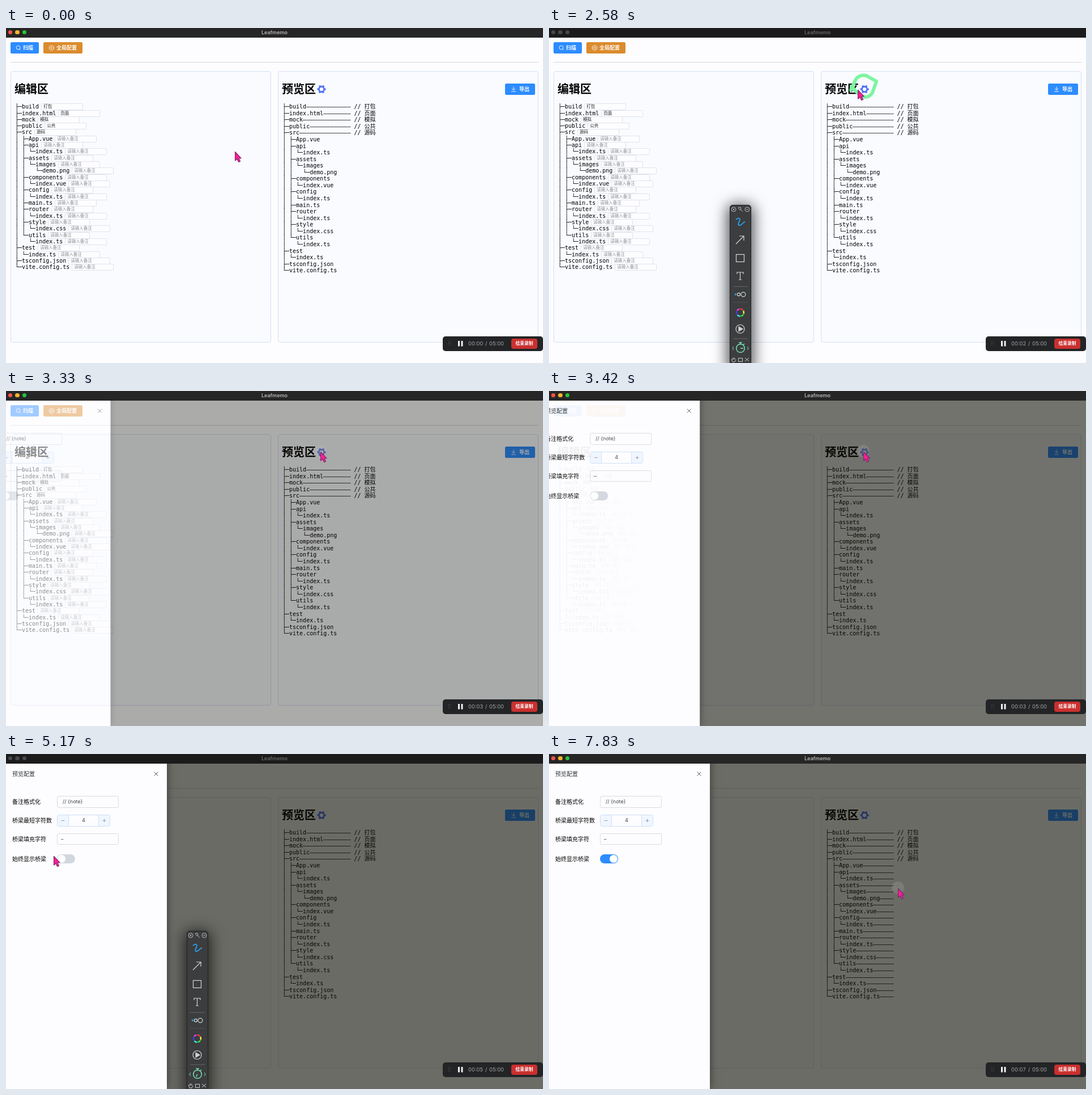
An HTML page for the animation above (8 s loop, 948 by 591 pixels).

```html
<!DOCTYPE html>
<html lang="zh-CN">
<head>
<meta charset="utf-8">
<title>Leafmemo</title>
<style>
:root { --blue: #2d8cff; --mono: 'DejaVu Sans Mono', 'Noto Sans CJK SC', monospace; }
* { box-sizing: border-box; }
html, body { margin: 0; width: 100%; height: 100%; overflow: hidden; }
body { background: #fdfdff; font: 10px/20px Inter, 'Noto Sans CJK SC', sans-serif; color: #000; }
#stage { position: relative; width: 948px; height: 591px; overflow: hidden; }
#stage div, #stage svg { position: absolute; }
.t { white-space: pre; }
svg { left: 0; top: 0; width: 948px; height: 591px; fill: none; overflow: visible; }

.bar { left: 0; top: 0; width: 948px; height: 16.5px; background: #262627; color: #b6b6b6;
  font-size: 9px; font-weight: 600; line-height: 15px; text-align: center; }
.bar i { position: absolute; top: 3.5px; width: 7.5px; height: 7.5px; border-radius: 50%; }
.bar.idle { background: #1b1b1c; color: #686868; animation: idle 8s step-end infinite; }
.bar.idle i { background: #47484a; }

.button { height: 20px; border-radius: 2.5px; color: #fff; background: var(--blue);
  font-size: 9px; font-weight: 700; text-align: right; }
.panel { top: 76px; width: 460px; height: 479px; border: 1px solid #d5def3; border-radius: 4px; background: #f9fbff; }
.heading { top: 93px; font-size: 20px; line-height: 30px; font-weight: 700; }
.row { display: flex; white-space: pre; font: 10px var(--mono); }
.row.edit { height: 11.32px; line-height: 11.32px; }
.row.view { height: 11.56px; line-height: 11.56px; }
.note { width: 74px; height: 12px; margin-left: 4px; padding-left: 3px; border: 1px solid #dfe3ec; border-radius: 2px;
  background: #fdfdff; font: 7.5px/10px Inter, 'Noto Sans CJK SC', sans-serif; color: #222; }
.note.empty { color: #8d9097; }
.late { animation: late 8s step-end infinite; }

#layer { left: 0; top: 16.5px; width: 948px; height: 575px; overflow: hidden; background: rgba(12,12,0,.6);
  animation: fade 8s linear infinite; }
#drawer { left: 0; top: -16.5px; width: 284px; height: 592px; background: #fdfdff;
  box-shadow: 0 0 14px rgba(0,0,0,.5); animation: slide 8s linear infinite; }
.label { left: 11px; font-weight: 500; }
.field { left: 90px; width: 108.5px; height: 20.5px; border: 1px solid #d8dbe3; border-radius: 3px;
  line-height: 18.5px; font-size: 9px; color: #3f4247; }
.step { top: 0; width: 20px; height: 18.5px; background: #f0f6ff; color: #7d8794; text-align: center;
  font-size: 13px; font-weight: 300; line-height: 17px; }
#toggle { left: 90px; top: 177px; width: 31.5px; height: 15.5px; border-radius: 8px; background: #d2d7df;
  animation: toggle 8s linear infinite; }
#knob { left: 1px; top: 1px; width: 13.5px; height: 13.5px; border-radius: 50%; background: #fff;
  animation: knob 8s linear infinite; }

#tools { left: 319px; top: 312px; width: 38px; height: 290px; border: 1px solid #202122; border-radius: 5px;
  background: #3b3d3e; box-shadow: 0 4px 26px 4px rgba(0,0,0,.7); }
.popup { opacity: 0; animation: popup 8s step-end infinite; }
.hand { transform-origin: 338px 565px; animation: spin 2s steps(24) infinite; }
.ink { stroke: #7cf5a0; stroke-width: 6; stroke-linecap: round; stroke-linejoin: round; stroke-dasharray: 1 2; opacity: 0; }
.ink.a { animation: drawA 8s linear infinite; }
.ink.b { animation: drawB 8s linear infinite; }

#recorder { left: 771px; top: 544px; width: 177px; height: 26px; border-radius: 5px; background: #222426; }
#recorder .t { top: 3px; color: #a3a4a6; font-size: 9.4px; }
#recorder #reel { top: 0; left: 0; animation: reel 8s step-end infinite; }
#seconds { left: 65.5px; top: 3px; width: 8px; height: 20px; overflow: hidden; }
#cursor { left: 0; top: 0; animation: move 8s linear infinite; }
#halo { left: -11px; top: -12px; width: 22px; height: 22px; border-radius: 50%; background: rgba(190,190,190,.2);
  animation: halo 8s linear infinite; }

@keyframes idle { 0%, 33.37%, 75%, 100% { opacity: 0 } 6.25%, 55.25% { opacity: 1 } }
@keyframes popup { 0%, 33.37%, 75%, 100% { opacity: 0 } 8.33%, 59.37% { opacity: 1 } }
@keyframes late { 0% { visibility: hidden } 86.45%, 100% { visibility: visible } }
@keyframes fade { 0%, 39.6% { opacity: 0 } 40.62% { opacity: .2 } 42.75% { opacity: .95 } 43.75%, 100% { opacity: 1 } }
@keyframes slide { 0%, 39.6% { transform: translateX(-284px) } 40.62% { transform: translateX(-240px) }
  41.67% { transform: translateX(-95px) } 42.75% { transform: translateX(-18px) } 43.75%, 100% { transform: none } }
@keyframes toggle { 0%, 85.4% { background: #d2d7df } 88.5%, 100% { background: #2d8cff } }
@keyframes knob { 0%, 85.4% { transform: none } 88.5%, 100% { transform: translateX(16px) } }
@keyframes spin { to { transform: rotate(360deg) } }
@keyframes drawA { 0%, 17.4% { opacity: 0; stroke-dashoffset: 1 } 17.5% { opacity: 1; stroke-dashoffset: 1 }
  25%, 33.36% { opacity: 1; stroke-dashoffset: 0 } 33.37%, 100% { opacity: 0; stroke-dashoffset: 0 } }
@keyframes drawB { 0%, 65.5% { opacity: 0; stroke-dashoffset: 1 } 65.6% { opacity: 1; stroke-dashoffset: 1 }
  72%, 74.99% { opacity: 1; stroke-dashoffset: 0 } 75%, 100% { opacity: 0; stroke-dashoffset: 0 } }
@keyframes reel { 0% { top: 0 } 13.5% { top: -20px } 26% { top: -40px } 38.5% { top: -60px } 51% { top: -80px }
  64.6% { top: -100px } 77.1% { top: -120px } 90.6%, 100% { top: -140px } }
@keyframes halo { 0%, 39% { opacity: 0 } 39.5%, 43.5% { opacity: 1 } 44.7%, 51% { opacity: 0 } 52%, 55.2% { opacity: 1 }
  56.5%, 85.2% { opacity: 0 } 85.4%, 86.4% { opacity: 1 } 87.5%, 96.8% { opacity: 0 } 97.8%, 100% { opacity: 1 } }
@keyframes move {
  0%, 5.2% { transform: translate(404px,218px) }
  15%, 17.5% { transform: translate(533px,109px) }
  18.9% { transform: translate(542px,90px) }
  20.2% { transform: translate(560px,84px) }
  21.4% { transform: translate(578px,94px) }
  22.7% { transform: translate(571px,114px) }
  23.6% { transform: translate(558px,122px) }
  25% { transform: translate(534px,103px) }
  27%, 35.3% { transform: translate(545px,109px) }
  38.5%, 45.8% { transform: translate(555px,107px) }
  52.1%, 60% { transform: translate(390px,198px) }
  64.6%, 65.6% { transform: translate(84px,180px) }
  67% { transform: translate(106px,168px) }
  68.8% { transform: translate(128px,186px) }
  70.3% { transform: translate(104px,200px) }
  72%, 75% { transform: translate(84px,178px) }
  78.1%, 80.2% { transform: translate(136px,209px) }
  82.2%, 86.6% { transform: translate(104px,179px) }
  88.5%, 90.6% { transform: translate(490px,256px) }
  97.8%, 100% { transform: translate(616px,237px) }
}
</style>
</head>
<body>
<div id="stage">
  <div class="bar"><i style="left:3.500px;background:#ff5149"></i><i style="left:16px;background:#fdb22b"></i><i style="left:28.500px;background:#28c33c"></i>Leafmemo</div>
  <div class="bar idle"><i style="left:3.500px"></i><i style="left:16px"></i><i style="left:28.500px"></i>Leafmemo</div>

  <div class="button" style="left:8px;top:25px;width:50px;padding-right:10px">扫描</div>
  <div class="button" style="left:66px;top:25px;width:69px;padding-right:10px;background:#db8b2d">全局配置</div>
  <div style="left:8px;top:60px;width:932px;height:1px;background:#d5d7df"></div>
  <div class="panel" style="left:8px"></div>
  <div class="panel" style="left:480px"></div>
  <div class="t heading" style="left:15px">编辑区</div>
  <div class="t heading" style="left:487px">预览区</div>
  <div class="button" style="left:881px;top:98px;width:53px;padding-right:10px">导出</div>
  <svg stroke="#fff" stroke-width=".9">
    <circle cx="21.6" cy="34.6" r="3.4"/><path d="M24 37l1.8 1.8"/>
    <path d="M80.500 30.500l4 2.300v4.500l-4 2.300-4-2.300v-4.500z"/><circle cx="80.500" cy="35" r="1.500"/>
    <path d="M896 103.500v6m-3-2.800l3 3 3-3M892 112h8"/>
    <circle cx="557" cy="108" r="4.600" stroke="#4a6cf7" stroke-width="2.600"/>
    <circle cx="557" cy="108" r="6.600" stroke="#4a6cf7" stroke-width="1.800" stroke-dasharray="3.450" stroke-dashoffset="1.700"/>
  </svg>
  <div id="edit"></div>
  <div id="view"></div>

  <div id="layer">
    <div id="drawer">
      <div class="t" style="left:11px;top:25px;color:#33363b;font-weight:500">预览配置</div>
      <div class="t label" style="top:74px">备注格式化</div>
      <div class="t label" style="top:107px">桥梁最短字符数</div>
      <div class="t label" style="top:140px">桥梁填充字符</div>
      <div class="t label" style="top:175px">始终显示桥梁</div>
      <div class="t field" style="top:74px;padding-left:9px">// {note}</div>
      <div class="field" style="top:107px;width:94px;border-color:#cfdff5;text-align:center">4
        <div class="step" style="left:0;border-right:1px solid #cfdff5">−</div>
        <div class="step" style="right:0;border-left:1px solid #cfdff5">+</div>
      </div>
      <div class="field" style="top:139.500px;padding-left:6px">–</div>
      <div id="toggle"><div id="knob"></div></div>
      <svg stroke="#55585e"><path d="M261.500 31.500l7 7m0-7l-7 7"/></svg>
    </div>
  </div>

  <div class="popup" id="tools"></div>
  <svg class="popup" stroke="#d4d6d7" stroke-width="1.200">
    <g stroke-width=".8">
      <circle cx="326" cy="320" r="4"/><path d="M324.500 318.500l3 3m0-3l-3 3"/>
      <path d="M334 317l4-1 1 4-2 1zM338 320l4 4"/>
      <circle cx="350" cy="320" r="4"/><path d="M348 320h4"/>
    </g>
    <path stroke="#2f9fee" stroke-width="1.800" d="M330 338c4-4 9-3 6 3s-2 9 3 6 4-5 7-5"/>
    <path d="M330 381l14-14m-8 0h8v8"/>
    <rect x="330.500" y="399.500" width="14" height="13"/>
    <path d="M332 434v-3h11v3M337.500 431v13M335 444h5"/>
    <path stroke="#66696b" stroke-width="1" d="M325 456h26M325 548h26"/>
    <path stroke="#66696b" stroke-width="1" stroke-dasharray="1.500" d="M325 484h26"/>
    <circle cx="329.300" cy="470" r="1.700" fill="#2f9fee" stroke="none"/>
    <circle cx="335" cy="470" r="2.600"/><circle cx="343" cy="470" r="3.900"/>
    <g id="wheel" stroke-width="2.400"></g>
    <circle cx="337.500" cy="531" r="7.500"/><path fill="#d4d6d7" d="M335 527l7 4-7 4z"/>
    <g stroke="#7be3b4" stroke-width="1.500">
      <circle cx="338" cy="565" r="7.300"/><path d="M335 555h6M338 555v3m5 1l2-2"/>
      <path class="hand" d="M338 565v-5"/>
      <path stroke-width="1" d="M326 562l-2 3 2 3m24-6l2 3-2 3"/>
    </g>
    <g stroke-width=".9">
      <path d="M322 584l2 5h4l2-4M324 585v-3m2 3v-4m2 4v-3"/>
      <rect x="334.500" y="582.500" width="7" height="6"/>
      <path d="M346 582l7 6m0-6l-7 6"/>
    </g>
  </svg>
  <svg>
    <path class="ink a" pathLength="1" d="M533 109L542 90Q548 82 560 84L578 94L571 114Q566 122 558 122Q547 119 534 103"/>
    <path class="ink b" pathLength="1" d="M84 180Q84 168 106 168Q130 170 128 186Q122 200 104 200Q86 198 84 178"/>
  </svg>

  <div id="recorder">
    <svg stroke="#55585a" stroke-width="1.200" stroke-dasharray="1.200 2">
      <path d="M10.500 8.500v9M13.500 8.500v9"/>
      <path stroke="#f2f2f2" stroke-width="3" stroke-dasharray="none" d="M28.500 8v9.500M34 8v9.500"/>
    </svg>
    <div class="t" style="right:111.500px">00:0</div>
    <div id="seconds"><div class="t" id="reel"></div></div>
    <div class="t" style="left:75px">/</div>
    <div class="t" style="left:82px">05:00</div>
    <div class="button" style="left:121px;top:4px;width:46px;height:18px;border-radius:4px;background:#c9302f;font-size:7.700px;line-height:18px;text-align:center">结束录制</div>
  </div>

  <div id="cursor">
    <div id="halo"></div>
    <svg><path fill="#ff1f96" stroke="#7b2468" stroke-width="1.100" stroke-linejoin="round" d="M.5 .5v15.500l3.500-3 2.600 5.600 2.900-1.400-2.600-5.400h4.300z"/></svg>
  </div>
</div>
<script>
const byId = id => document.getElementById(id);
const file = (name, note = '') => ({ name, note, kids: [] });
const dir = (name, ...names) => ({ name, note: '', kids: names.map(n => n.name ? n : file(n)) });

const src = dir('src', 'App.vue', dir('api', 'index.ts'), dir('assets', dir('images', 'demo.png')),
  dir('components', 'index.vue'), dir('config', 'index.ts'), 'main.ts', dir('router', 'index.ts'),
  dir('style', 'index.css'), dir('utils', 'index.ts'));
src.note = '源码';
const roots = [file('build', '打包'), file('index.html', '页面'), file('mock', '模拟'), file('public', '公共'),
  src, dir('test', 'index.ts'), file('tsconfig.json'), file('vite.config.ts')];

const flatten = (nodes, lead = '') => nodes.flatMap(({ name, note, kids }, i) => {
  const last = i === nodes.length - 1;
  return [{ text: lead + (last ? '└─' : '├─') + name, note },
    ...flatten(kids, lead + (last ? '  ' : '│ '))];
});

const rows = flatten(roots);
const bridgeEnd = Math.max(...rows.map(r => r.text.length)) + 4;
const row = (kind, left, top, html) =>
  `<div class="row ${kind}" style="left:${left}px;top:${top}px">${html}</div>`;

byId('edit').innerHTML = rows.map(({ text, note }, i) => row('edit', 16, 133.2 + 11.32 * i,
  `${text}<span class="note ${note ? '' : 'empty'}">${note || '请输入备注'}</span>`)).join('');

byId('view').innerHTML = rows.map(({ text, note }, i) => {
  const bridge = '–'.repeat(bridgeEnd - text.length);
  return row('view', 488, 133.2 + 11.56 * i,
    text + (note ? `${bridge} // ${note}` : `<span class="late">${bridge}</span>`));
}).join('');

byId('reel').textContent = [...Array(8).keys()].join('\n');
byId('wheel').innerHTML = [...Array(6).keys()].map(i =>
  `<path stroke="hsl(${i * 60},90%,60%)" transform="rotate(${i * 60} 337.5 502)" d="M337.500 495.500a6.500 6.500 0 0 1 5 2.300"/>`).join('');
</script>
</body>
</html>
```
